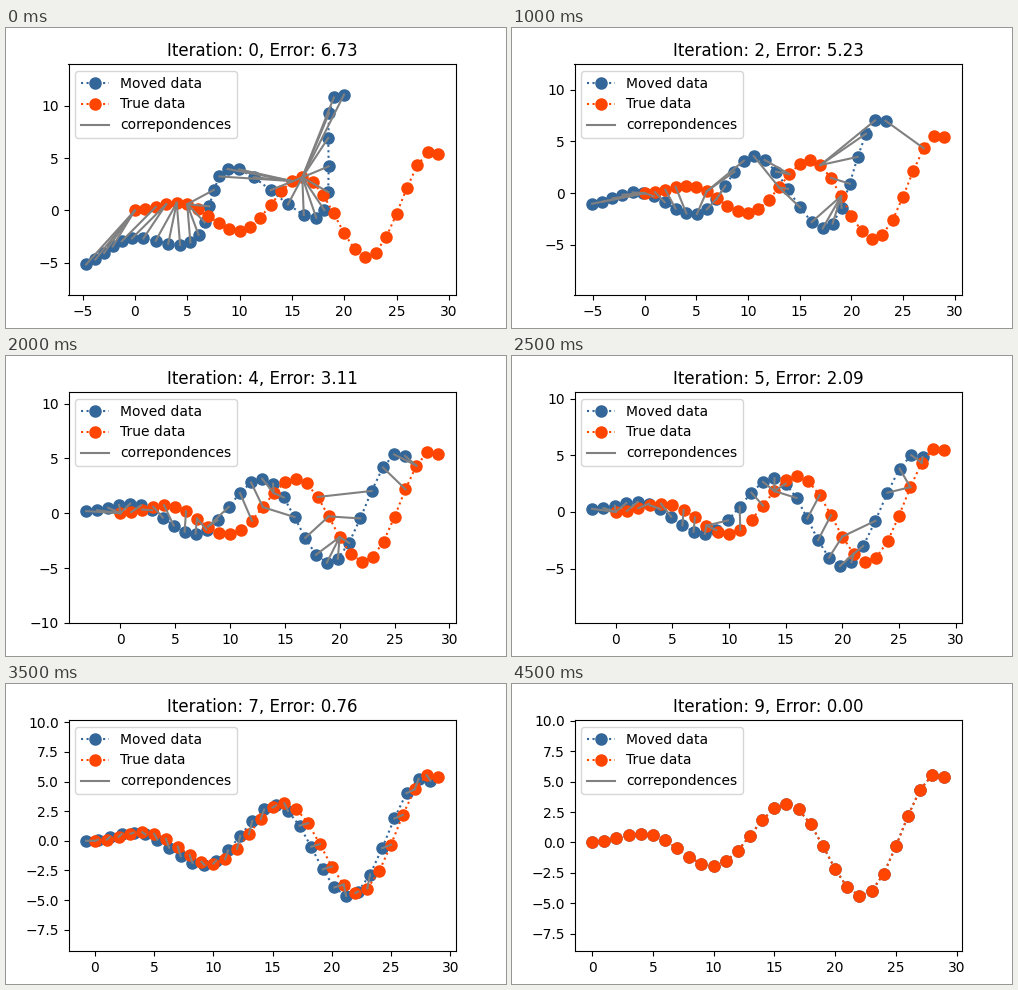
Recreate the animation shown at these times as a matplotlib script. Size 500 by 300 pixels, loop 5000 ms.

```python
import numpy as np
import matplotlib.pyplot as plt
from matplotlib.animation import FuncAnimation

STEPS = 10
INTERVAL = 500
BLUE, ORANGE, GREY = "#336699", "orangered", "grey"


def rot(a):
    return np.array([[np.cos(a), -np.sin(a)], [np.sin(a), np.cos(a)]])


def d_rot(a):
    return rot(a + np.pi / 2)


def nearest(p, q):
    dist = np.linalg.norm(p[:, :, None] - q[:, None, :], axis=0)
    return dist.argmin(axis=1)


def icp(p, q, steps):
    """Point-to-point ICP, one Gauss-Newton step per iteration."""
    pose = np.zeros(3)
    moved = p
    states = []
    for _ in range(steps):
        match = nearest(moved, q)
        residual = rot(pose[2]) @ p + pose[:2, None] - q[:, match]
        turn = d_rot(pose[2]) @ p
        hess, grad = np.zeros((3, 3)), np.zeros(3)
        for r, t in zip(residual.T, turn.T):
            jac = np.column_stack([np.eye(2), t])
            hess += jac.T @ jac
            grad += jac.T @ r
        pose = pose + np.linalg.solve(hess, -grad)
        moved = rot(pose[2]) @ p + pose[:2, None]
        error = np.linalg.norm(moved - q, axis=0).mean()
        states.append((moved, match, error))
    return states


x = np.arange(30.0)
true_data = np.array([x, 0.2 * x * np.sin(0.5 * x)])
start_data = rot(np.pi / 4) @ true_data + np.array([[-2.0], [5.0]])
states = icp(start_data, true_data, STEPS)

fig, ax = plt.subplots(figsize=(5, 3), dpi=100)


def dots(data, color, label):
    ax.plot(*data, color=color, marker="o", markersize=8, ls=":", label=label)


def draw(i):
    moved, match, error = states[i]
    ax.clear()
    ax.axis("equal")
    dots(moved, BLUE, "Moved data")
    dots(true_data, ORANGE, "True data")
    for k, (a, b) in enumerate(zip(moved.T, true_data[:, match].T)):
        label = "correpondences" if k == 0 else None
        ax.plot([a[0], b[0]], [a[1], b[1]], color=GREY, label=label)
    ax.legend(loc="upper left")
    ax.set_title(f"Iteration: {i}, Error: {error:.2f}")


anim = FuncAnimation(fig, draw, frames=STEPS, interval=INTERVAL, repeat=True)
plt.show()
```
